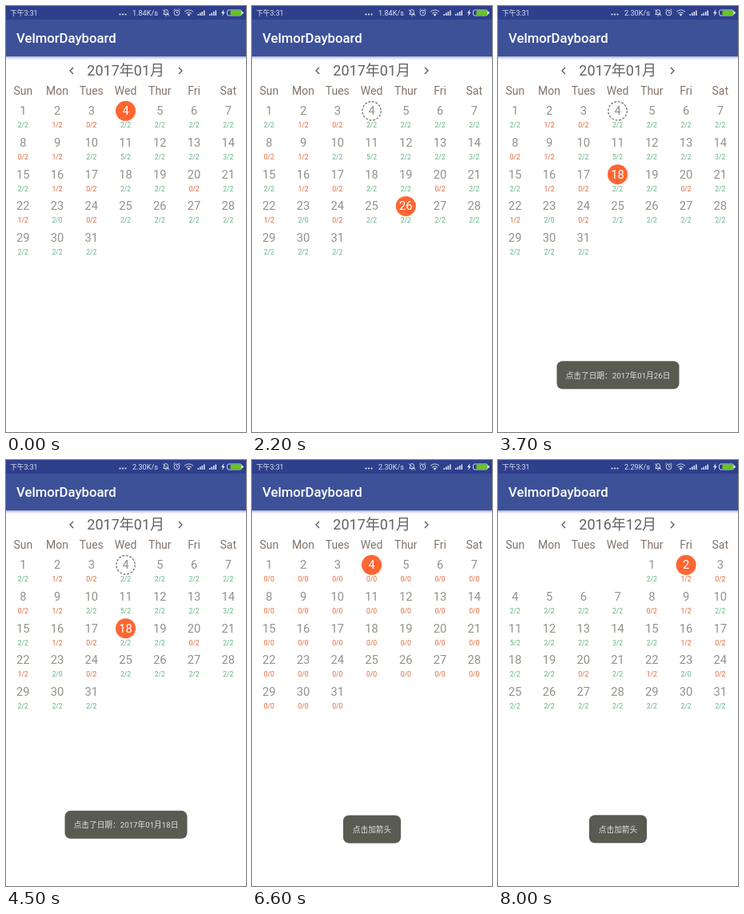
These frames come from a looping animation (300x533 px, 8.1 s). An HTML page:

```html
<!DOCTYPE html>
<html lang="zh">
<head>
<meta charset="utf-8">
<title>Calendar</title>
<style>
html, body { margin: 0; width: 100%; height: 100%; overflow: hidden; background: #fff; }
svg { display: block; width: 100vw; height: 100vh; }
text { font-family: Roboto, "Noto Sans CJK SC", "Noto Sans CJK", sans-serif; }
#days text, #week text, #month, #toast text { text-anchor: middle; }
#week { font-size: 14px; fill: #83746a; }
.day { font-size: 14.7px; fill: #92928a; }
.task { font-size: 8.6px; fill: #62b583; }
.due { fill: #e2683a; }
.picked { fill: #fff; }
#month { font-size: 18px; fill: #626262; }
.status text { font-size: 8.8px; fill: #e0e4f4; }
.line { fill: none; stroke: #e0e4f4; stroke-width: .9; }
#toast text { font-size: 9.7px; fill: #e2e2dc; }
</style>
</head>
<body>
<svg viewBox="0 0 300 533" preserveAspectRatio="none">
  <defs>
    <linearGradient id="shade" x2="0" y2="1">
      <stop stop-color="#8a92c4" stop-opacity=".8"/>
      <stop offset="1" stop-color="#dfe3ff" stop-opacity="0"/>
    </linearGradient>
  </defs>
  <rect width="300" height="533" fill="#fff"/>
  <rect y="63" width="300" height="5" fill="url(#shade)"/>
  <rect width="300" height="63" fill="#3d5199"/>
  <rect width="300" height="17" fill="#2e3f8c"/>
  <text x="13" y="46.2" font-size="16.7" font-weight="500" fill="#fff">VelmorDayboard</text>

  <g class="status">
    <text x="5" y="11.7">下午3:31</text>
    <g fill="#e0e4f4">
      <circle cx="142.5" cy="10.5" r="1.1"/><circle cx="146" cy="10.5" r="1.1"/><circle cx="149.5" cy="10.5" r="1.1"/>
    </g>
    <text id="speed" x="158" y="11.8" style="font-size:9.1px"></text>
    <path class="line" d="M196.500 10.500h7M197.500 10.500V7.500a2.500 3 0 0 1 5 0v3M199 12h2M196 4.500l8 8"/>
    <g class="line">
      <circle cx="213.5" cy="8.5" r="3.4"/>
      <path d="M213.500 6.500v2.200h1.700M209.300 5.500l2-2M217.700 5.500l-2-2"/>
      <path d="M223 7.200q5.500-4.600 11 0M225 9.200q3.500-2.800 7 0"/>
    </g>
    <path fill="#e0e4f4" d="M226.500 10.500q2-1.400 4 0l-2 2.200z"/>
    <g id="bars" fill="#e0e4f4"></g>
    <path fill="#e0e4f4" d="M272.500 4l-3.500 5h2l-1 4 3.700-5.200h-2z"/>
    <rect class="line" x="276.5" y="5" width="18" height="7" rx="2"/>
    <rect x="280.5" y="5.5" width="13.5" height="6" rx="1.5" fill="#66c61c"/>
    <rect x="295" y="7" width="1.5" height="3" fill="#e0e4f4"/>
  </g>

  <path d="M84 77l-4 4 4 4M216 77l4 4-4 4" fill="none" stroke="#555" stroke-width="1.3"/>
  <text id="month" x="149.7" y="87"></text>
  <g id="week"></g>
  <g id="days"></g>
  <g id="toast">
    <rect y="444.3" height="35" rx="7" fill="#5a5b50"/>
    <text x="150" y="465.5"></text>
  </g>
</svg>
<script>
const LOOP = 8100;
const $ = s => document.querySelector(s);
const colX = i => 21.3 + 42.75 * i;
const rowY = r => 131 + 39.7 * r;

// Tasks done / planned; every other day is 2/2
const tasks = {
  2: '1/2', 3: '0/2', 8: '0/2', 9: '1/2', 11: '5/2', 14: '3/2', 16: '1/2',
  17: '0/2', 20: '0/2', 22: '1/2', 23: '2/0', 24: '0/2'
};

const dec = { title: '2016年12月', first: 4, count: 31 };
const jan = { title: '2017年01月', first: 0, count: 31, today: 4 };
const feb = { title: '2017年02月', first: 3, count: 28 };

const views = [
  { at: 0, month: jan, pick: 4, loaded: true },
  { at: 700, month: jan, pick: 26, loaded: true },
  { at: 3300, month: jan, pick: 18, loaded: true },
  { at: 4800, month: feb },
  { at: 5800, month: jan, pick: 4 },
  { at: 6900, month: dec },
  { at: 7500, month: dec, loaded: true },
  { at: 7700, month: dec, pick: 2, loaded: true }
];
const speeds = [
  { at: 0, text: '1.84K/s' }, { at: 3300, text: '2.30K/s' }, { at: 7300, text: '2.29K/s' }
];
const toasts = [
  { at: 2250, end: 4050, text: '点击了日期：2017年01月26日', width: 153 },
  { at: 4380, end: 5980, text: '点击了日期：2017年01月18日', width: 153 },
  { at: 6315, end: LOOP, text: '点击加箭头', width: 72 }
];
const FADE_IN = 90, FADE_OUT = 280;

const latest = (list, t) => list.filter(e => e.at <= t).pop();
const clamp = v => Math.max(0, Math.min(1, v));

function dayCell(view, day) {
  const { month, pick, loaded } = view;
  const slot = month.first + day - 1;
  const x = colX(slot % 7), y = rowY(Math.floor(slot / 7));
  const task = loaded ? tasks[day] || '2/2' : '0/0';
  const [done, total] = task.split('/');
  const due = !loaded || +done < +total;
  let ring = '';
  if (day === pick) {
    ring = `<circle cx="${x}" cy="${y + .3}" r="12.5" fill="#ff6633"/>`;
  } else if (day === month.today) {
    ring = `<circle cx="${x}" cy="${y + .3}" r="11.7" fill="none" stroke="#666" stroke-width="1.2" stroke-dasharray="2.8 1.8"/>`;
  }
  return `${ring}<text class="day${day === pick ? ' picked' : ''}" x="${x}" y="${y + 5.3}">${day}</text>` +
    `<text class="task${due ? ' due' : ''}" x="${x}" y="${y + 21.3}">${task}</text>`;
}

function drawMonth(view) {
  $('#month').textContent = view.month.title;
  $('#days').innerHTML = Array.from({ length: view.month.count }, (_, i) => dayCell(view, i + 1)).join('');
}

// The toast springs up into place, then fades away
function drawToast(t) {
  const toast = latest(toasts, t);
  const group = $('#toast');
  if (!toast || t > toast.end + FADE_OUT) {
    group.setAttribute('opacity', 0);
    return;
  }
  const age = t - toast.at;
  const gone = clamp((t - toast.end) / FADE_OUT);
  const spring = age > 500 ? 0 : 24 * Math.exp(-.005 * age) * Math.cos(2 * Math.PI * age / 380);
  const box = group.querySelector('rect'), label = group.querySelector('text');
  box.setAttribute('x', 150 - toast.width / 2);
  box.setAttribute('width', toast.width);
  if (label.textContent !== toast.text) label.textContent = toast.text;
  group.setAttribute('opacity', clamp(age / FADE_IN) * (1 - gone));
  group.setAttribute('transform', `translate(0 ${spring + 24 * gone * gone})`);
}

$('#week').innerHTML = ['Sun', 'Mon', 'Tues', 'Wed', 'Thur', 'Fri', 'Sat']
  .map((d, i) => `<text x="${colX(i)}" y="111.3">${d}</text>`).join('');
$('#bars').innerHTML = [239.5, 254].map(x => [0, 1, 2, 3].map(i =>
  `<rect x="${x + i * 2.5}" y="${10 - i * 1.5}" width="1.5" height="${2 + i * 1.5}"/>`).join('')).join('');

let shown;
function frame(now) {
  const t = now % LOOP;
  const view = latest(views, t);
  if (view !== shown) drawMonth(shown = view);
  $('#speed').textContent = latest(speeds, t).text;
  drawToast(t);
  requestAnimationFrame(() => frame(performance.now()));
}
frame(performance.now());
</script>
</body>
</html>
```
